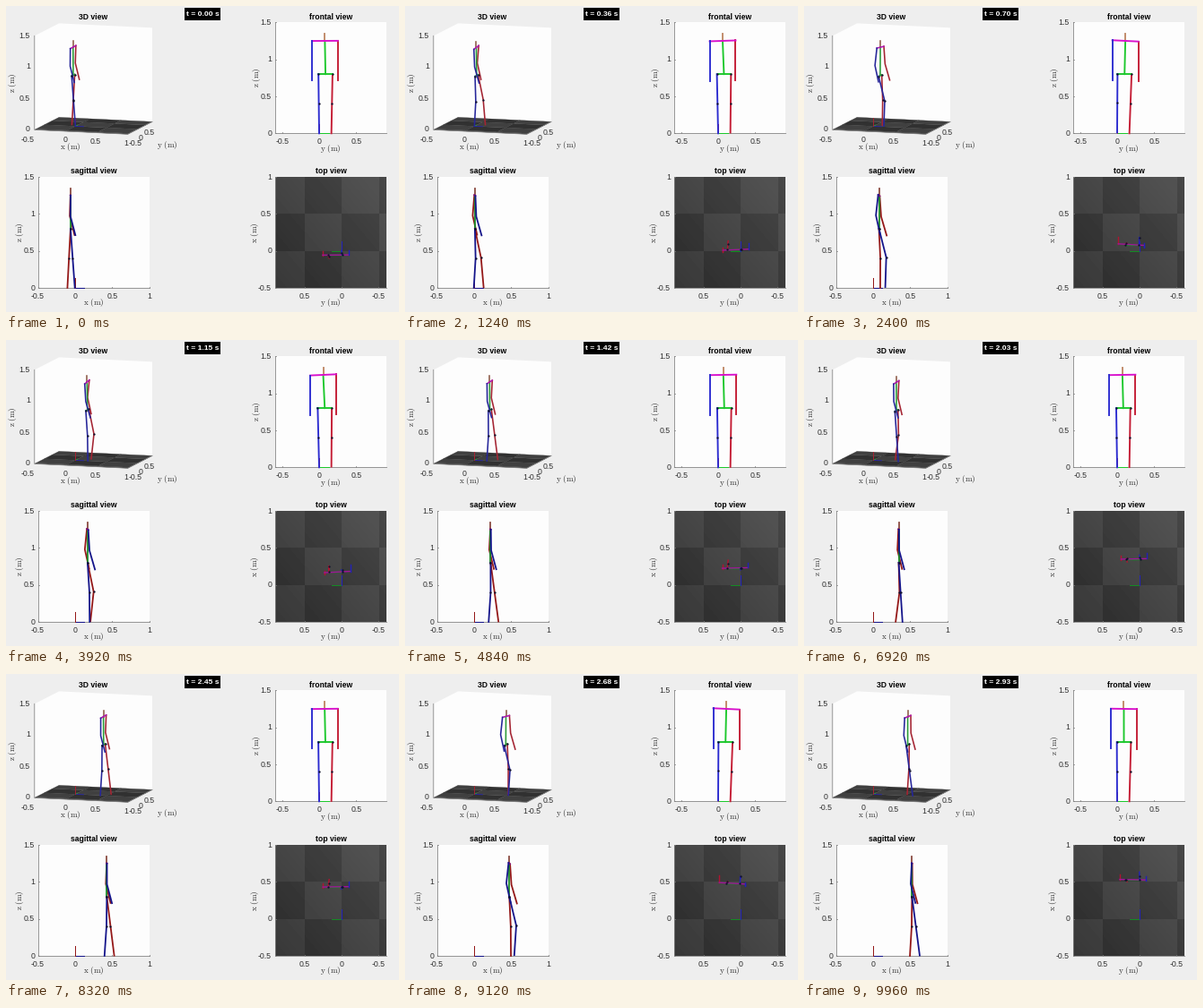
A matplotlib script for the animation above (10 s loop, 438 by 342 pixels).

```python
import math

import numpy as np
import matplotlib.pyplot as plt
from matplotlib.animation import FuncAnimation
from matplotlib.patches import Polygon, Rectangle

W, H, DPI = 438, 342, 100
FRAMES, INTERVAL = 250, 40
PT = 72 / DPI            # points per pixel
SIZE = 124               # side of a flat panel in pixels
SCALE = SIZE / 1.5       # pixels per metre in the flat views
STEP = 0.5               # seconds per step
STRIDE = 0.1             # metres gained per step
LIMB = 0.4005            # thigh and shank length
HIP_Z, SHOULDER_Z, HEAD_Z = 0.80, 1.25, 1.345

plt.rcParams["font.family"] = "Liberation Sans"
plt.rcParams["mathtext.fontset"] = "cm"

fig = plt.figure(figsize=(W / DPI, H / DPI), dpi=DPI, facecolor="#eeeeee")
ax = fig.add_axes([0, 0, 1, 1])
ax.set_xlim(0, W)
ax.set_ylim(H, 0)
ax.axis("off")


# Projections from metres to stage pixels

def to_3d(p):
    x, y, z = np.moveaxis(np.asarray(p, float), -1, 0)
    u, v = x + 0.5, y + 0.6
    return (31.8 + 69.3 * u + 18.2 * v,
            138.3 + 3.3 * u - 9.3 * v - 70 * z)


def to_front(p):
    _, y, z = np.moveaxis(np.asarray(p, float), -1, 0)
    return 349 + SCALE * y, 142.3 - SCALE * z


def to_side(p):
    x, _, z = np.moveaxis(np.asarray(p, float), -1, 0)
    return 76.7 + SCALE * x, 315 - SCALE * z


def to_top(p):
    x, y, _ = np.moveaxis(np.asarray(p, float), -1, 0)
    return 373.8 - SCALE * y, 273.5 - SCALE * x


# Static scenery

def label(x, y, s, size=8.8, **kw):
    style = dict(ha="center", va="center", color="#303030")
    style.update(kw)
    return ax.text(x, y, s, fontsize=size * PT, **style)


def title(x, y, s):
    label(x, y, s, 8.7, weight="bold", color="black")


def unit(x, y, name, rotation=0):
    label(x, y, rf"$\mathrm{{{name}\ (m)}}$", 9.2, rotation=rotation)


def line(xs, ys):
    ax.plot(xs, ys, color="#808080", lw=0.8 * PT, zorder=2)


def flat_panel(x, y, xticks, yticks, fill=True):
    """Square panel with ticks given as (offset in pixels, text)."""
    if fill:
        ax.add_patch(Rectangle((x, y), SIZE, SIZE, fc="#fdfdfd", ec="none"))
    line([x, x, x + SIZE], [y, y + SIZE, y + SIZE])
    for d, s in xticks:
        line([x + d, x + d], [y + SIZE, y + SIZE - 1.5])
        label(x + d, y + SIZE + 9.5, s)
    for d, s in yticks:
        line([x, x + 1.5], [y + d, y + d])
        label(x - 3.5, y + d, s, ha="right")


def floor_3d(light, dark):
    xs = [-0.5, 0, 0.5, 1]
    ys = [-0.6, -0.5, 0, 0.5, 0.9]
    for i, (x0, x1) in enumerate(zip(xs, xs[1:])):
        for j, (y0, y1) in enumerate(zip(ys, ys[1:])):
            corners = [(x0, y0, 0), (x1, y0, 0), (x1, y1, 0), (x0, y1, 0)]
            color = light if (i + j) % 2 else dark
            ax.add_patch(Polygon(np.column_stack(to_3d(corners)),
                                 fc=color, ec=color, lw=0.2, zorder=1))


def floor_top(left, top):
    """Checkerboard seen from above, lit from the upper right."""
    v, u = np.mgrid[0:SIZE, 0:SIZE] + 0.5
    x, y = 1 - v / SCALE, 0.9 - u / SCALE
    even = (np.floor(2 * x) + np.floor(2 * y)) % 2 == 0
    shade = np.where(even, 0.22, 0.17) + 0.06 * u / SIZE + 0.05 * (1 - v / SIZE)
    ax.imshow(shade, cmap="gray", vmin=0, vmax=1, aspect="auto", zorder=1,
              extent=[left, left + SIZE, top + SIZE, top])


def scenery():
    walls = [(-0.5, -0.6, 1.5), (-0.5, 0.9, 1.5), (1, 0.9, 1.5),
             (1, 0.9, 0), (-0.5, 0.9, 0), (-0.5, -0.6, 0)]
    ax.add_patch(Polygon(np.column_stack(to_3d(walls)), fc="#fdfdfd", ec="none"))
    floor_3d("#404040", "#313131")
    edge = [(-0.5, -0.6, 1.5), (-0.5, -0.6, 0), (1, -0.6, 0), (1, 0.9, 0)]
    line(*to_3d(edge))
    for k, s in enumerate(["0", "0.5", "1", "1.5"]):
        label(27, 138 - 35 * k, s, ha="right")
    for x, y, s in [(24, 149, "-0.5"), (66, 150, "0"),
                    (100, 151, "0.5"), (134, 153, "1")]:
        label(x, y, s)
    for x, y, s in [(137, 153, "-0.5"), (148, 147, "0"), (153.5, 141, "0.5")]:
        label(x, y, s, ha="left")
    title(97.5, 12.6, "3D view")
    unit(72, 158, "x")
    unit(180, 156, "y")
    unit(7.5, 86, "z", 90)

    height = [(0, "1.5"), (41.3, "1"), (82.7, "0.5"), (124, "0")]
    flat_panel(299.5, 18.3, [(8.3, "-0.5"), (49.5, "0"), (90.8, "0.5")], height)
    title(362, 12.6, "frontal view")
    unit(362, 160, "y")
    unit(279, 80, "z", 90)

    flat_panel(35.5, 191, [(0, "-0.5"), (41.3, "0"), (82.7, "0.5"), (124, "1")],
               height)
    title(97.5, 184.8, "sagittal view")
    unit(97.5, 332, "x")
    unit(15, 253, "z", 90)

    floor_top(299.5, 191)
    flat_panel(299.5, 191, [(33, "0.5"), (74.2, "0"), (115.5, "-0.5")],
               [(0, "1"), (41.3, "0.5"), (82.7, "0"), (124, "-0.5")], fill=False)
    title(362, 184.8, "top view")
    unit(362, 332, "y")
    unit(277, 253, "x", 90)

    ax.add_patch(Rectangle((199, 2), 40, 14, fc="black", ec="none"))


# Walking model

def smooth(u):
    u = min(max(u, 0), 1)
    return u * u * (3 - 2 * u)


def foot(t, side):
    """Foot on side 0 (red) or 1 (blue); the swing overshoots, then retracts."""
    k = int(t / STEP)
    p = t / STEP - k
    y = 0 if side else 0.165
    if k % 2 != side:
        return np.array([STRIDE * k, y, 0])
    s = 1.16 * smooth(p / 0.62) - 0.16 * smooth((p - 0.88) / 0.12)
    return np.array([STRIDE * (k - 1 + 2 * s), y, 0.012 * math.sin(math.pi * p)])


def leg(hip, ankle):
    gap = ankle - hip
    half = np.linalg.norm(gap) / 2
    bulge = math.sqrt(max(LIMB ** 2 - half ** 2, 0))
    knee = (hip + ankle) / 2 + bulge * np.array([-gap[2], 0, gap[0]]) / (2 * half)
    return np.array([hip, knee, ankle])


def arm(shoulder, swing):
    points = [shoulder]
    for a, length in ((swing - 0.02, 0.28), (0.4 * swing + 0.25, 0.265)):
        points.append(points[-1] + length * np.array([math.sin(a), 0, -math.cos(a)]))
    return np.array(points)


def pose(t):
    sway = math.sin(2 * math.pi * (t + 0.02))
    x = -0.058 + 0.2 * t
    hip_y, neck_y = 0.087 - 0.013 * sway, 0.081 - 0.03 * sway
    hips = [np.array([x, hip_y + d, HIP_Z]) for d in (0.095, -0.095)]
    shoulders = [np.array([x - d * 0.06 * sway, neck_y + d,
                           SHOULDER_Z + 0.05 * d * sway])
                 for d in (0.175, -0.175)]
    legs = [leg(h, foot(t, i)) for i, h in enumerate(hips)]
    neck = [x, neck_y, SHOULDER_Z]
    return {
        "red arm": arm(shoulders[0], -0.09 * sway),
        "red leg": legs[0],
        "pelvis": np.array(hips),
        "torso": np.array([[x, hip_y, HIP_Z], neck]),
        "head": np.array([neck, [x, neck_y, HEAD_Z]]),
        "shoulders": np.array(shoulders),
        "blue leg": legs[1],
        "blue arm": arm(shoulders[1], 0.09 * sway),
        "joints": np.concatenate([legs[0][:2], legs[1][:2]]),
    }


# Views: projection, line width, red, blue, green, magenta, head
VIEWS = [
    (to_3d, 1.6, "#a42432", "#26269a", "#2a9a38", "#b018b0", "#8c5a48"),
    (to_front, 1.9, "#c41c34", "#2c2cd0", "#1cc82c", "#d810cc", "#c08a68"),
    (to_side, 1.8, "#941818", "#14148a", "#188a28", "#801080", "#8a4a40"),
    (to_top, 1.4, "#b01430", "#2222b8", "#148a24", "#a01498", "#8a4a40"),
]


def axes_marker(project, red, blue, green):
    tips = [((0, 0.13, 0), green), ((0.13, 0, 0), blue), ((0, 0, 0.13), red)]
    for tip, color in tips:
        xs, ys = project([(0, 0, 0), tip])
        ax.plot(xs, ys, color=color, lw=PT, zorder=3)


def build_view(project, width, red, blue, green, magenta, head):
    axes_marker(project, red, blue, green)
    colors = {"pelvis": green, "torso": green, "head": head, "shoulders": magenta}
    parts = {}
    for name in pose(0):
        if name == "joints":
            parts[name], = ax.plot([], [], "o", ms=2.3 * PT, mew=0,
                                   color="#10102c", zorder=5)
            continue
        color = colors.get(name) or (red if name.startswith("red") else blue)
        parts[name], = ax.plot([], [], color=color, lw=width * PT, zorder=4,
                               solid_joinstyle="round")
    return project, parts


scenery()
figures = [build_view(*view) for view in VIEWS]
clock = label(219, 9.3, "", 8.5, weight="bold", color="white")


def update(n):
    t = max(0, 0.01178 * n - 0.004)
    body = pose(t)
    for project, parts in figures:
        for name, artist in parts.items():
            artist.set_data(*project(body[name]))
    clock.set_text(f"t = {t:.2f} s")
    return [clock]


anim = FuncAnimation(fig, update, frames=FRAMES, interval=INTERVAL,
                     init_func=lambda: update(0), repeat=True, repeat_delay=0)
plt.show()
```
